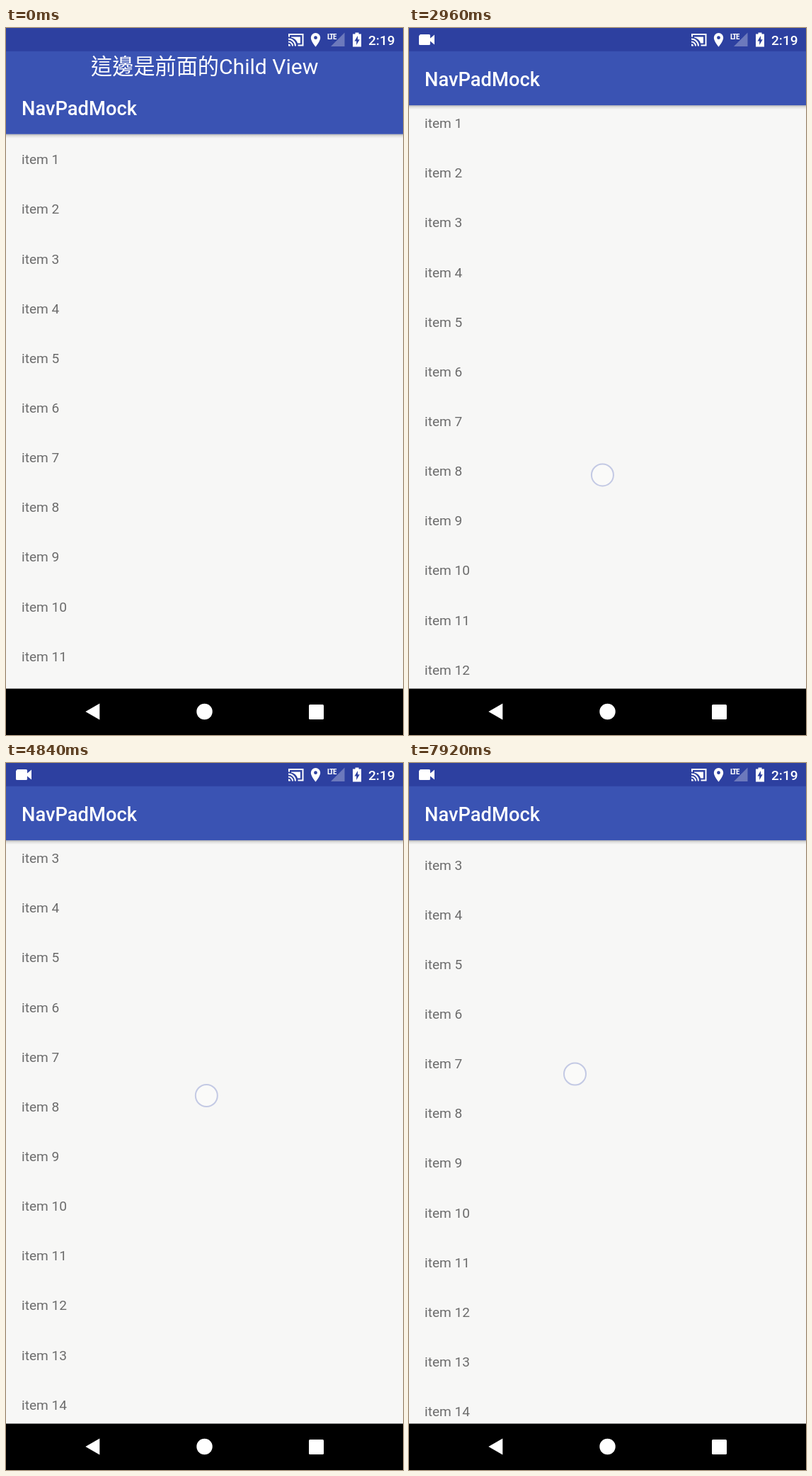
These frames come from a looping animation (561 px wide and 998 px high, 8 s). An HTML page:

```html
<!DOCTYPE html>
<html lang="zh-Hant">
<head>
<meta charset="utf-8">
<style>
html, body { margin: 0; width: 100%; height: 100%; overflow: hidden; background: #000; }
svg { display: block; width: 561px; height: 998px; font-family: Roboto, "Noto Sans CJK TC", "Noto Sans CJK", sans-serif; }
</style>
</head>
<body>
<svg viewBox="0 0 561 998">
  <defs>
    <linearGradient id="shade" x2="0" y2="1">
      <stop stop-color="#000" stop-opacity=".28"/>
      <stop offset=".4" stop-color="#000" stop-opacity=".1"/>
      <stop offset="1" stop-color="#000" stop-opacity="0"/>
    </linearGradient>
  </defs>
  <rect width="561" height="933" fill="#f7f7f6"/>
  <g id="list" font-size="19.1" fill="#6c6c6c"></g>
  <g id="bar">
    <rect y="149.800" width="561" height="6" fill="url(#shade)"/>
    <rect width="561" height="149.800" fill="#3a53b3"/>
    <g fill="#fff">
      <text x="280.800" y="65" font-size="30.150" text-anchor="middle">這邊是前面的Child View</text>
      <text x="22" y="122.500" font-size="27.300" font-weight="500">NavPadMock</text>
    </g>
  </g>
  <rect width="561" height="32.800" fill="#2d40a0"/>
  <g fill="#fff">
    <path id="cam" d="M15.500 9h13q1.500 0 1.500 1.500v4l6-5v14l-6-5v4q0 1.500-1.500 1.500h-13q-1.500 0-1.500-1.500v-11q0-1.500 1.500-1.500z"/>
    <g fill="none" stroke="#fff" stroke-width="2">
      <path d="M400 12.500V9h19.500v15.500h-7"/>
      <path d="M399 19.500a6 6 0 0 1 6 6M399 15.500a10 10 0 0 1 10 10"/>
    </g>
    <path d="M403 12.500h13v9h-4q-2-6.500-9-8zM399 22.500a3 3 0 0 1 3 3h-3z"/>
    <path fill-rule="evenodd" d="M437.500 7a6.700 6.700 0 0 1 6.700 6.700c0 5-6.700 12.800-6.700 12.800s-6.700-7.800-6.700-12.800a6.700 6.700 0 0 1 6.700-6.700zm0 4.300a2.400 2.400 0 1 0 0 4.800a2.400 2.400 0 1 0 0-4.800z"/>
    <text x="454" y="16" font-size="11" font-weight="700" font-family="'Roboto Condensed', Roboto, sans-serif" letter-spacing="-1.100">LTE</text>
    <path d="M478.500 6.500v19.500h-19.500z" opacity=".3"/>
    <path fill-rule="evenodd" d="M493.500 6.500h5v2h3.500v18h-12v-18h3.500zM497 11l-4.500 7.500h2.700v5.500l4.500-7.800h-2.700z"/>
    <text x="512" y="23.700" font-size="19.100" font-weight="500">2:19</text>
  </g>
  <circle id="touch" r="15.500" fill="#fff" fill-opacity=".4" stroke="#c3c9e4" stroke-width="2"/>
  <rect y="932.550" width="561" height="66" fill="#000"/>
  <g fill="#fff">
    <path d="M112.300 965l20-11.500v23z"/>
    <circle cx="280.500" cy="965" r="11.200"/>
    <rect x="428" y="955" width="21" height="21" rx="1.500"/>
  </g>
</svg>
<script>
const LOOP = 8000, PITCH = 70.15, COLLAPSE = 40.7;
const get = id => document.getElementById(id);
const [list, bar, touch, cam] = ['list', 'bar', 'touch', 'cam'].map(get);

for (let i = 0; i < 18; i++)
  list.innerHTML += `<text x="22" y="${192.2 + PITCH * i}">item ${i + 1}</text>`;

// Turning points of the gesture
const poses = [
  { at: 1480, scroll: 0, y: 688 },
  { at: 2280, scroll: 25, y: 663 },
  { at: 2640, scroll: 25, y: 663 },
  { at: 3440, scroll: 90, y: 583 },
  { at: 3640, scroll: 90, y: 583 },
  { at: 4480, scroll: 147, y: 526 },
  { at: 5480, scroll: 270, y: 369.5 },
  { at: 6000, scroll: 307, y: 303 },
  { at: 7240, scroll: 307, y: 303 },
  { at: 7920, scroll: 182, y: 439 }
];

function pose(t) {
  const next = poses.findIndex(p => p.at > t);
  if (next < 1) return poses.at(next);
  const a = poses[next - 1], b = poses[next];
  const mix = key => a[key] + (b[key] - a[key]) * (t - a.at) / (b.at - a.at);
  return { scroll: mix('scroll'), y: mix('y') };
}

const move = (el, x, y) => el.setAttribute('transform', `translate(${x} ${y})`);
const show = (el, on) => el.setAttribute('visibility', on ? 'visible' : 'hidden');

function draw(t) {
  const { scroll, y } = pose(t);
  // The thumb swings right as it travels up
  const x = t < 7000 ? 272.7 + (688 - y) ** 2 / 4500 : 234.5;
  move(list, 0, -scroll);
  move(bar, 0, -Math.min(scroll, COLLAPSE));
  move(touch, x, y);
  show(touch, t >= 1280 && t < 5640 || t >= 7240);
  show(cam, t >= 80);
}

const start = performance.now();
function tick() {
  draw((performance.now() - start) % LOOP);
  requestAnimationFrame(tick);
}
tick();
</script>
</body>
</html>
```
